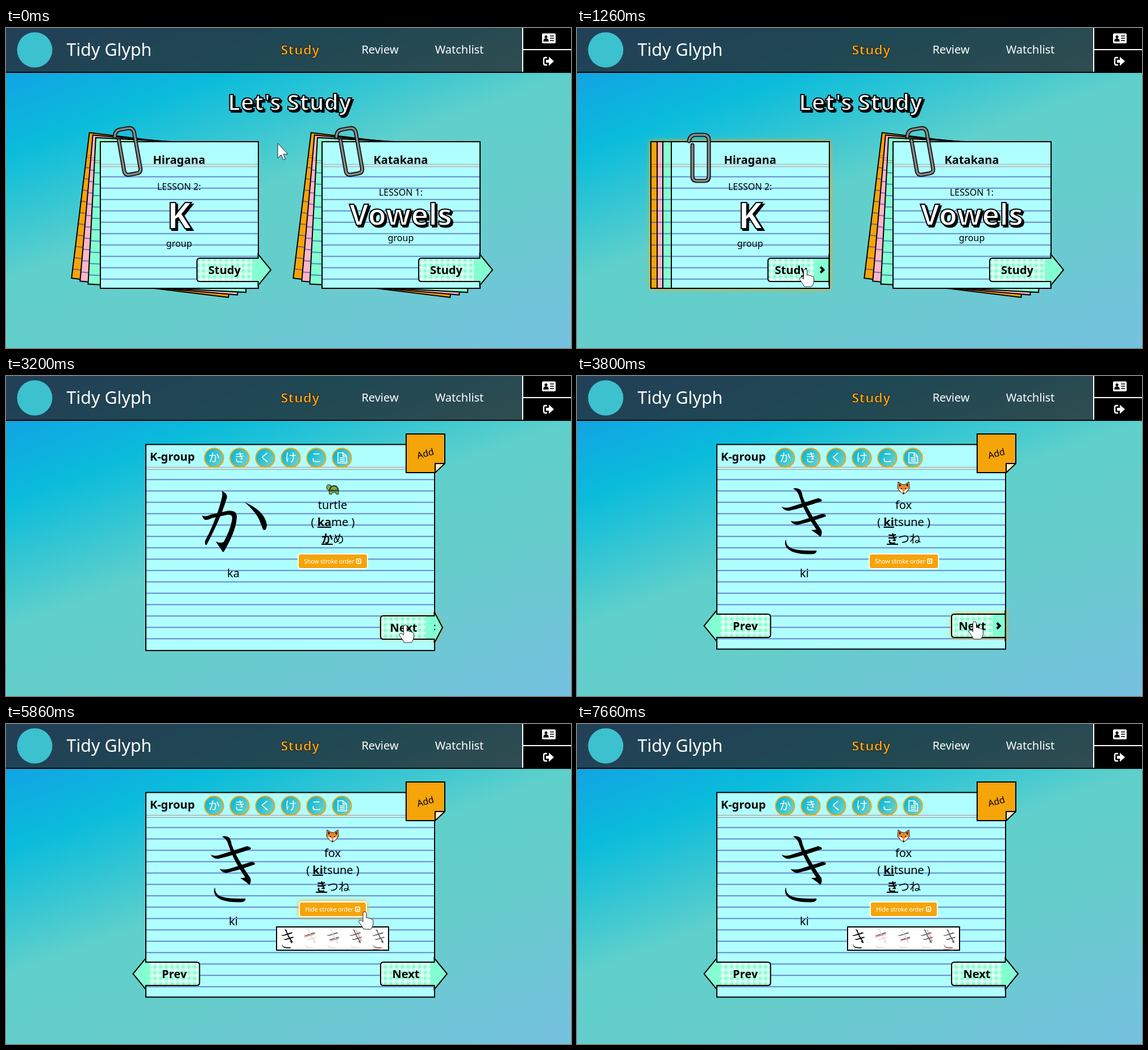
Recreate the animation shown at these times as an HTML page. Size 994x563 px, loop 7800 ms.

```html
<!DOCTYPE html>
<html lang="en">
<head>
<meta charset="utf-8">
<title>Kana lessons</title>
<style>
  html, body { margin: 0; width: 100%; height: 100%; overflow: hidden; }
  body { background: linear-gradient(160deg, #1597e8 0%, #0abcdb 24%, #5fd0cb 48%, #66cdcb 66%, #76c1e0 100%); }
  svg { display: block; }
  text { font-family: "Noto Sans", "Noto Sans CJK JP", "Open Sans", sans-serif; text-anchor: middle; white-space: pre; }
  .b { font-weight: bold; }
  .m { font-weight: 500; }
  .w { fill: #fff; }
  .u { font-weight: bold; text-decoration: underline; }
  .gold { fill: #f5a623; stroke: #111; stroke-width: .8; font-weight: bold; }
  .big { fill: #fff; stroke: #000; stroke-width: 2; font-weight: bold; }
  .shade { fill: #000; stroke: #000; stroke-width: 2; font-weight: bold; }
  .line { fill: none; stroke: #000; stroke-width: 2; }
</style>
</head>
<body>
<svg width="994" height="563" viewBox="0 0 994 563">
  <defs>
    <linearGradient id="sea" x1="0" y1=".2" x2="1" y2=".8">
      <stop offset=".1" stop-color="#0ab9da"/><stop offset=".9" stop-color="#66d0c9"/>
    </linearGradient>
    <pattern id="gingham" width="10" height="10" patternUnits="userSpaceOnUse">
      <path d="M0 0H5V10H0ZM0 0" fill="#fff" opacity=".5"/>
      <path d="M0 0H10V5H0Z" fill="#fff" opacity=".5"/>
    </pattern>
  </defs>
  <path d="M0 0H994V78H0Z" fill="#26262c" opacity=".77"/>
  <path d="M0 78H994" class="line"/>
  <circle cx="50.5" cy="38.5" r="31" fill="#3cc1cf"/>
  <path d="M909 0H994V79H909Z"/>
  <path d="M909 0V77M909 38H994" stroke="#fff" stroke-width="2"/>
  <rect x="943" y="9.5" width="24" height="17.5" rx="2" fill="#fff"/>
  <path d="M946 23Q946 19 950 19T954 23ZM957 14H964M957 18H964M957 22H964" stroke="#000" stroke-width="1.3"/>
  <circle cx="950" cy="15.5" r="2.5"/>
  <path d="M952 52H949Q946 52 946 55V62Q946 65 949 65H952" fill="none" stroke="#fff" stroke-width="2.4"/>
  <path d="M950 56H955V50.5L964 58.5L955 66.5V61H950Z" fill="#fff"/>
  <g id="scene"></g>
</svg>
<script>
const LOOP = 7800, KA_AT = 1800, KI_AT = 3650, STROKES_AT = 5000, CURSOR_OFF = 7200;
const ORANGE = '#f5a40a', MINT = '#84ffd2', PAPER = '#b0ffff';

// cursor path: time, x, y
const PATH = [[0, 478, 203], [150, 478, 203], [900, 402, 424], [2100, 401, 424], [3250, 704, 438],
  [3700, 704, 438], [4400, 625, 330], [5100, 625, 330], [5600, 631, 330], [5950, 631, 330], [6550, 848, 422], [LOOP, 848, 422]];

const KA = ['M345 245Q350 249 360 244L391 237Q406 236 406 247Q406 270 384 308Q382 312 379 306L369 291Q376 295 383 292Q396 268 398 250Q398 243 390 244L362 250Q354 254 350 253Q346 250 345 245Z',
  'M380 202L387 207Q390 212 388 216Q378 250 353 297Q350 299 350 291Q352 286 357 277Q374 240 380 213Q381 207 380 202Z',
  'M420 222Q455 237 459 262Q458 274 452 270Q449 262 446 254Q440 240 420 222Z'];
const KI = ['M360 230Q366 233 374 231L424 215Q431 216 431 220Q400 231 374 237Q365 238 360 230Z',
  'M376 255Q383 257 392 255L430 243Q438 242 438 247Q410 257 388 262Q380 262 376 255Z',
  'M380 198Q387 196 393 200Q396 205 397 212Q405 235 430 271Q432 278 428 283Q423 278 412 271Q418 271 421 270Q400 240 391 212Q389 203 380 198Z',
  'M368 288Q367 300 380 304Q395 308 421 307Q423 310 417 313Q398 315 381 310Q366 304 366 294Q366 289 368 288Z'];
const KI_GUIDES = ['M362 244L428 226', 'M378 268L438 252', 'M402 200L436 270', 'M362 318L424 322'];

const smooth = u => (u = Math.min(1, Math.max(0, u)), u * u * (3 - 2 * u));
const ramp = (t, start, len = 400) => smooth((t - start) / len);
const hover = (t, on, off, len) => ramp(t, on, len) - ramp(t, off, len);

const text = (x, y, size, s, cls = '') => `<text x="${x}" y="${y}" font-size="${size}" class="${cls}">${s}</text>`;
const bigText = (x, y, size, s) => text(x + 3, y + 3, size, s, 'shade') + text(x, y, size, s, 'big');
const path = (d, attrs = '') => `<path d="${d}" ${attrs}/>`;
const glow = (p, size) => p > 0 ? `style="filter:drop-shadow(0 0 ${size}px rgba(255,170,20,${p}))"` : '';

function paper(x, y, w, h, fill, attrs = '') {
  let rules = '';
  for (let r = 61.7; r < h - 4; r += 20) rules += `M${x} ${y + r}h${w}`;
  return `<g ${attrs}><rect x="${x}" y="${y}" width="${w}" height="${h}" fill="${fill}"/>` +
    path(`M${x} ${y + 40}h${w}m${-w} 4h${w}`, 'stroke="rgba(200,40,40,.55)" stroke-width="1.2"') +
    path(rules, 'stroke="rgba(50,60,170,.6)" stroke-width="2"') +
    `<rect x="${x}" y="${y}" width="${w}" height="${h}" class="line"/></g>`;
}

function arrow(x, y, w, edge, p = 0) {
  const end = x + w - 16 * p, tip = 22.5 * (1 - p ** 1.5);
  const d = `M${edge} ${y - 20.5}H${x + 5}q-5 0-5 5v31q0 5 5 5H${edge}v7l${tip}-27.5L${edge} ${y - 27.5}Z`;
  return path(d, `fill="${MINT}"`) +
    `<rect x="${x + 1}" y="${y - 19.5}" width="${end - x - 1}" height="39" fill="url(#gingham)"/>` +
    path(d, 'class="line"') +
    (p > 0 ? `<svg x="${end}" y="${y - 10}" width="${edge + 1.5 - end}" height="20">` +
      path(`M${edge + 17 - 32 * p - end} 5l5 5l-5 5`, 'fill="none" stroke="#000" stroke-width="4"') + '</svg>' : '');
}

function stack(x, p, title, lesson, group, size, lift) {
  const sheets = [[-36, 7, '#f5a40a'], [-25, 5, '#ffb5c8'], [-15, 3, MINT]].map(([dx, turn, fill]) =>
    paper(x + dx, 200, 278, 258, fill, `transform="rotate(${turn * (1 - p)} ${x + dx + 139} 329)"`)).join('');
  const wire = 'M197 199q2-11 12-11H222q10 0 10 10V261q0 8-8 8H211q-8 0-8-8V206';
  const wireAttrs = 'fill="none" stroke-linecap="round"';
  const mid = x + 138.5;
  return `<g ${glow(p, 4)}>${sheets}${paper(x, 200, 278, 258, PAPER)}${arrow(x + 170, 425.5, 97, x + 277.5, p)}</g>` +
    `<g transform="translate(${x - 166 - (1 - p)} ${-11 * (1 - p)}) rotate(${-10 * (1 - p)} 215 228)">` +
    path(wire, wireAttrs + ' stroke="#111" stroke-width="7"') + path(wire, wireAttrs + ' stroke="#8b8b8b" stroke-width="3.4"') + '</g>' +
    text(mid, 239, 20, title, 'b') + text(mid, 285 + lift, 16, lesson, 'm') +
    bigText(mid, 353 - lift * .6, size, group) + text(mid, 385 - lift, 16, 'group', 'm') +
    text(x + 218.5 - 8 * p, 432.5, 20, 'Study', 'b');
}

const home = t => bigText(499, 145, 40, "Let's Study") +
  stack(166, ramp(t, 450), 'Hiragana', 'LESSON 2:', 'K', 65, 0) +
  stack(556, 0, 'Katakana', 'LESSON 1:', 'Vowels', 52, 10);

const turtle = path('M564 196q0-5 4-5t4 4l-1 6h-4q-3-1-3-5Z', 'fill="#7fb33f" stroke="#222"') +
  path('M568 201h17v7h-4l-1-3h-6l-1 3h-4Z', 'fill="#7fb33f" stroke="#222"') +
  path('M569 202q1-9 8-9t8 9Z', 'fill="#3f8a4d" stroke="#222" stroke-width="1.4"') +
  path('M573 199l2-3M577 200v-5M581 199l-2-3', 'stroke="#e7b43c" stroke-width="1.5"');
const fox = path('M565 186l7 5h5l7-5l1 12l-5 6l-5.500 4l-5.500-4l-5-6Z', 'fill="#e88a2c" stroke="#222" stroke-linejoin="round"') +
  path('M566 198l6 2l2.500 7l2.500-7l6-2l-4 6l-4.500 4l-4.500-4Z', 'fill="#fff"') +
  path('M567 189l3 3l-3 3ZM582 189l-3 3l3 3ZM572.500 205h4l-2 3Z') +
  '<circle cx="571" cy="198" r="1.100"/><circle cx="578" cy="198" r="1.100"/>';

function strokeChart() {
  let s = '<rect x="476" y="357" width="197" height="41" fill="#fff" class="line" style="fill:#fff"/>';
  for (let i = 0; i < 5; i++) {
    const parts = KI.map((d, k) => path(d, `fill="${!i ? '#000' : k < i ? '#666' : '#ddd'}"`)).join('');
    const guide = i ? path(KI_GUIDES[i - 1], 'stroke="#e07070" stroke-width="4"') : '';
    s += `<g transform="translate(${495 + 40 * i} 378) scale(.285) translate(-399 -255)">${parts}${guide}</g>`;
  }
  return s;
}

function strokeButton(t) {
  const open = t >= STROKES_AT, inset = open ? 2 : 0;
  const icon = 616 - inset;
  return `<rect x="${514 + inset}" y="313" width="${122 - 2 * inset}" height="26" rx="4" fill="${ORANGE}" stroke="#fff" stroke-width="2" ${glow(hover(t, 4250, 6000, 200), 4)}/>` +
    text(568.5, 329.5, 10.3, (open ? 'Hide' : 'Show') + ' stroke order', 'w m') +
    `<rect x="${icon + .7}" y="322" width="7.6" height="7.6" rx="1" fill="none" stroke="#fff" stroke-width="1.6"/>` +
    path(open ? `M${icon + 2.2} 327.500h4.600l-2.300-3Z` : `M${icon + 2.2} 324.500h4.600l-2.300 3Z`, 'class="w"');
}

function lesson(t) {
  const ki = t >= KI_AT, y = ki ? 439.5 : 442.5, p = hover(t, 3000, 3780);
  let s = paper(246, 120.5, 508, ki ? 360 : 362.5, PAPER) + text(292.5, 149, 20, 'K-group', 'b');
  [...'かきくけこ', ''].forEach((c, i) => {
    const x = 366 + 45 * i;
    s += `<circle cx="${x}" cy="144" r="16.7" fill="url(#sea)" stroke="${ORANGE}" stroke-width="2"/>` + text(x, 151, 20, c, 'w');
  });
  s += path('M584 135h9l6 6v12h-15ZM593 135v6h6M587 144h9M587 147h9M587 150h9', 'fill="none" stroke="#fff" stroke-width="1.6"');
  s += path('M704 102H772V153L755 170H704Z', `fill="${ORANGE}" stroke="#000" stroke-width="2"`) +
    path('M755 154H772L755 170Z', 'fill="#fff1cf" stroke="#000" stroke-width="2" stroke-linejoin="round"') +
    `<g transform="rotate(-15 738 137)">${text(738, 142, 16, 'Add')}</g>`;
  s += (ki ? KI : KA).map(d => path(d)).join('') + text(400, 354, 20, ki ? 'ki' : 'ka') + (ki ? fox : turtle);
  const bold = c => `<tspan class="u">${c}</tspan>`;
  s += text(574.5, 234, 20, ki ? 'fox' : 'turtle') +
    text(575, 264, 20, ki ? `( ${bold('ki')}tsune )` : `( ${bold('ka')}me )`) +
    text(575, 294, 20, ki ? bold('き') + 'つね' : bold('か') + 'め');
  s += strokeButton(t) + (t >= STROKES_AT ? strokeChart() : '');
  s += `<g ${glow(p, 3)}>${arrow(659, y, 88, 753.5, p)}</g>` + text(703.5 - 8 * p, y + 7, 20, 'Next', 'b');
  if (ki) s += `<g transform="matrix(-1 0 0 1 999.5 0)">${arrow(659, y, 88, 753.5)}</g>` + text(296, y + 7, 20, 'Prev', 'b');
  return s;
}

function cursor(t) {
  if (t >= CURSOR_OFF) return '';
  const i = PATH.findIndex(k => k[0] > t), [t0, x0, y0] = PATH[i - 1], [t1, x1, y1] = PATH[i];
  const u = smooth((t - t0) / (t1 - t0)), x = x0 + (x1 - x0) * u, y = y0 + (y1 - y0) * u;
  const within = (l, top, r, b) => x > l && x < r && y > top && y < b;
  const hand = t < KA_AT ? within(166, 200, 444, 458) : within(658, 418, 775, 464) || within(513, 312, 637, 340);
  const shape = hand
    ? 'M-3 3Q-3 0 0 0T3 3V11Q5 9 7 12Q9 10 11 13Q14 12 15 16V22Q14 27 11 31H-2Q-4 26-9 20Q-12 17-9 15Q-6 14-3 18Z'
    : 'M0 0V26L6 20L10 29L13.500 27.500L10 19H18Z';
  return path(shape, `transform="translate(${x} ${y})" fill="#fff" stroke="#222" stroke-linejoin="round"`);
}

function nav(t) {
  const plain = t >= KA_AT && t < 2100;
  return text(181.5, 49, 30.4, 'Tidy Glyph', 'w') +
    (plain ? text(517.5, 45, 20, 'Study', 'w') : text(517.5, 46.5, 24, 'Study', 'gold')) +
    text(658, 45, 20, 'Review', 'w') + text(797.5, 45, 20, 'Watchlist', 'w');
}

const scene = document.getElementById('scene');
let shown = '';
function frame() {
  const t = performance.now() % LOOP;
  const next = nav(t) + (t < KA_AT ? home(t) : lesson(t)) + cursor(t);
  if (next !== shown) scene.innerHTML = shown = next;
  requestAnimationFrame(frame);
}
frame();
</script>
</body>
</html>
```
